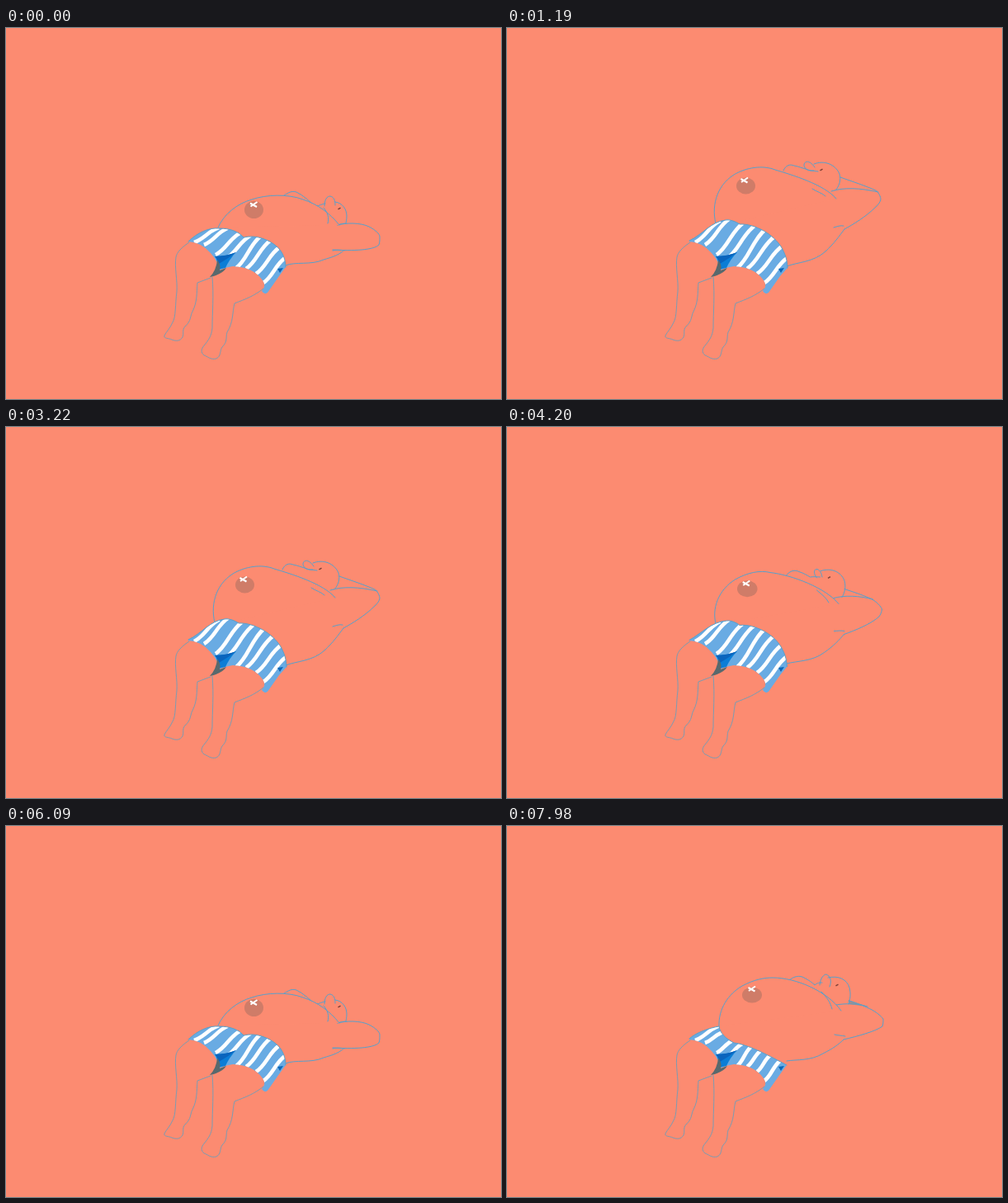
Write an HTML page that moves like this. It is 600 px wide and 450 px high and loops after 8 s.

```html
<!DOCTYPE html>
<html lang="en">
<head>
<meta charset="utf-8">
<title>Sunbather</title>
<style>
  html, body { margin: 0; width: 100%; height: 100%; overflow: hidden; background: #fc8b71; }
  svg { display: block; width: 600px; height: 450px; }
  .line { fill: none; stroke: #58a0cb; stroke-width: 1; stroke-linecap: round; stroke-linejoin: round; }
  .leg { stroke: #7b9cb2; }
</style>
</head>
<body>
<svg viewBox="0 0 600 450">
  <defs><clipPath id="clip"><path id="cut"/></clipPath></defs>
  <rect width="600" height="450" fill="#fc8b71"/>
  <path class="line leg" d="M222 260C213 266 207 272 206 278C204 290 208 306 207 320C205 335 206 351 202 357C199 364 194 369 192 373C191 377 197 376 201 378C206 380 211 380 214 375C216 370 213 367 217 362C225 355 223 349 226 344C232 332 231 322 232 309L248 303"/>
  <path class="line leg" d="M250 302C252 325 250 345 250 364C249 374 245 379 241 384C236 390 236 393 240 397C244 398 248 403 255 401C261 398 259 391 262 387C269 380 266 376 268 369C276 356 274 346 277 334C290 329 301 325 312 316"/>
  <path id="patch" d="M414 211L437 219L414 216Z" fill="#a68d88"/>
  <path id="behind" class="line"/>
  <path id="belly" class="line" style="fill:#fc8b71"/>
  <path id="marks" class="line"/>
  <path id="shorts" fill="#69abe3"/>
  <path id="stripes" clip-path="url(#clip)" fill="none" stroke="#fff" stroke-width="4.6"/>
  <path d="M253 277Q266 277 279 272Q271 280 266 291L256 293Q258 284 253 277Z" fill="#0b7dd6"/>
  <path d="M253 277Q266 277 279 272Q270 279 258 286Q257 281 253 277Z" fill="#0a64bd"/>
  <path d="M256 281Q261 288 259 294L267 291Q262 299 247 302Q255 294 256 281Z" fill="#58696d"/>
  <path d="M329 292L336 291L332 297Z" fill="#0b68ba"/>
  <path id="waist" class="line"/>
  <ellipse id="navel" fill="#cf7c68"/>
  <path id="cross" d="M-4-1.5L4 3M4.5-3L-3.5 2.5" stroke="#fff" stroke-width="2.1" fill="none"/>
  <path id="eye" d="M-1.5 .8L1.5-.8" stroke="#7c4038" stroke-width="1.5"/>
</svg>
<script>
const el = id => document.getElementById(id);
const NUM = /-?\d+(\.\d+)?/g;
const HEM = "L331 301L317 321Q313 324 310 319Q316 313 311 306Q300 290 275 289Q266 290 258 294Q258 284 248 273Q237 260 221 259Z";

// Stripe: foot on the hem, then its place along the waistband
const STRIPES = [
  [228, 260, .275], [240, 263, .35], [254, 275, .465], [266, 280, .56],
  [279, 291, .645], [291, 292, .735], [303, 298, .83], [312, 309, .93]
];

// Each pose: arm, inner arm, head, nose, shoulder, back / belly / neck and crease / waist / spots
const POSES = {
  low: [
    "M402 239C412 236 430 236 440 241C448 245 453 250 453 253C453 258 453 260 452 263C447 268 430 271 396 269M402 239C405 238 408 237 412 237M399 211C408 212 413 220 413 228C413 233 412 235 412 237M386 216C386 208 389 204 393 204C398 205 399 210 399 215M337 203C342 200 346 197 352 199C361 203 368 211 375 216C380 216 383 213 387 213M339 288C350 283 370 288 385 281C395 278 402 276 408 271",
    "M257 242C264 226 280 213 298 208C315 202 342 201 360 208C378 214 392 224 404 239",
    "M385 218C390 224 392 230 390 237M396 270C400 269 405 269 410 270",
    "M221 259C232 248 246 242 258 243C272 243 282 247 288 254C304 250 320 258 327 264C336 271 339 282 339 290",
    "300.5 220.5 11.5 10.5 300 214 404 219 0"],
  rise1: [
    "M414 212C421 214 428 216 436 220C446 224 453 230 456 234C456 238 456 240 455 243C447 249 425 255 408 259M399 217C410 215 425 215 437 219M389 184C402 181 412 186 415 196C417 204 416 210 414 216M379 193C380 184 384 180 387 180C392 182 394 188 391 195M342 187C348 182 355 181 360 184C366 187 370 190 373 193C376 190 379 190 382 190M339 285C352 283 368 285 383 276C395 270 402 265 408 259",
    "M253 240C248 222 260 203 278 192C293 184 303 181 313 181C345 181 388 200 405 222",
    "M381 201C388 208 392 214 394 222M397 253C401 254 405 254 410 255",
    "M221 259C236 249 248 238 268 237C274 237 279 240 282 243C300 240 322 253 328 262C336 272 338 282 339 290",
    "293 201 13 10 292 194.5 400 193 1"],
  rise2: [
    "M404 181C418 186 436 192 447 197C451 200 453 205 453 208C452 212 450 214 447 217C435 229 420 238 409 244M393 198C408 193 428 194 450 199M372 165C384 160 398 165 403 177C405 184 403 192 398 197M372 173C364 174 360 170 360 166C361 160 368 161 373 169M335 173C338 166 343 165 348 167C354 168 358 170 362 171C366 173 370 173 377 174M339 289C352 284 372 284 386 271C396 262 403 252 409 244",
    "M254 241C247 218 253 192 275 178C290 169 310 166 325 172C345 178 385 190 399 207",
    "M370 195C376 199 382 200 386 204M396 242C400 241 404 239 408 240",
    "M221 258C238 250 247 235 265 233C270 232 278 235 282 238C302 237 324 252 332 265C337 273 340 282 340 291",
    "289.5 191.5 11.5 10 287.5 184.5 381 172 0"],
  full: [
    "M398 171C412 174 430 180 442 186C448 190 450 194 450 198C449 203 447 206 444 209C434 222 420 230 409 236M388 189C402 184 424 184 446 189M366 154C378 149 393 154 398 167C400 174 398 182 393 188M365 162C357 161 354 156 354 153C356 148 363 150 368 158M334 141C338 142 342 146 346 150C350 154 354 156 358 158C361 160 364 161 368 162M339 289C358 284 378 280 391 262C400 250 405 244 409 236",
    "M240 231C222 190 228 140 258 115C280 97 310 99 332 118C352 136 366 162 388 194",
    "M368 188C374 192 380 194 384 198M396 236C400 235 404 233 408 234",
    "M221 258C226 250 232 240 240 231C245 246 256 258 268 266C284 275 306 281 318 285C326 288 333 290 339 290",
    "274 141 11 11 271 133 376 162 0"],
  fall1: [
    "M408 192C420 194 442 198 451 203C456 206 457 210 457 213C456 217 452 221 447 224C435 236 420 247 407 249M396 206C410 202 435 202 454 204M381 171C392 168 405 176 408 187C408 195 405 201 399 206M370 175C369 169 373 167 376 168C380 170 382 174 382 178M344 176C350 170 357 168 362 170C366 172 369 174 371 176C373 178 375 180 377 181M339 288C355 285 375 284 386 272C395 265 402 257 407 249",
    "M249 237C249 212 264 188 285 177C302 170 318 169 335 174C355 180 386 196 400 214",
    "M374 201C380 204 386 209 390 213M397 247C401 245 405 244 409 244",
    "M221 258C228 252 240 241 249 237C254 247 262 258 271 264C285 270 306 279 318 284C326 288 333 289 339 290",
    "292.5 194 11 10 291 187 389 179 0"]
};
// Same upper body as rise1, with the belly sinking over the waistband
POSES.fall2 = [
  POSES.rise1[0],
  "M257 243C256 222 268 204 285 194C300 186 312 184 322 184C350 184 388 200 405 224",
  POSES.rise1[2],
  "M221 258C228 251 245 245 257 243C258 251 265 258 275 263C292 265 316 278 324 282C331 286 336 288 339 290",
  "297 205 12 9.5 296.5 197.5 400 193 1"
];

// Two breaths in 29 steps
const STEP = 70, CYCLE = 29, LOOP = 8000;
const KEYS = [
  [0, "low"], [1, "rise1"], [3, "rise2"], [6, "full"], [8, "full"],
  [11, "fall1"], [12, "fall2"], [13, "low"], [14, "low"], [15, "rise1"],
  [17, "rise2"], [21, "full"], [23, "full"], [26, "fall1"], [27, "fall2"], [29, "low"]
];

function mix(a, b, k) {
  const to = b.match(NUM);
  let i = 0;
  return a.replace(NUM, n => +(+n + (to[i++] - n) * k).toFixed(2));
}

function poseAt(step) {
  const j = KEYS.findIndex(key => key[0] > step);
  const [s0, a] = KEYS[j - 1], [s1, b] = KEYS[j];
  let k = (step - s0) / (s1 - s0);
  if (b === "full") k = Math.sin(k * Math.PI / 2);
  else if (a === "full") k = 1 - Math.cos(k * Math.PI / 2);
  return POSES[a].map((part, i) => mix(part, POSES[b][i], k));
}

// Slightly wavy bands from the hem to just past the waistband
function stripePath() {
  const waist = el("waist"), length = waist.getTotalLength();
  return STRIPES.map(([x, y, place]) => {
    const top = waist.getPointAtLength(place * length);
    const dx = top.x - x, dy = top.y - y;
    const at = (u, v) => `${x + dx * u} ${y + dy * v}`;
    return `M${x} ${y}C${at(.45, .25)} ${at(.55, .75)} ${at(1.05, 1.05)}`;
  }).join("");
}

function draw(step) {
  const [behind, belly, marks, waist, spots] = poseAt(step);
  const [nx, ny, rx, ry, cx, cy, ex, ey, shade] = spots.split(" ").map(Number);
  const set = (id, attrs) => {
    for (const name in attrs) el(id).setAttribute(name, attrs[name]);
  };
  set("behind", { d: behind });
  set("belly", { d: belly });
  set("marks", { d: marks });
  set("waist", { d: waist });
  set("shorts", { d: waist + HEM });
  set("cut", { d: waist + HEM });
  set("stripes", { d: stripePath() });
  set("navel", { cx: nx, cy: ny, rx, ry });
  set("cross", { transform: `translate(${cx} ${cy})` });
  set("eye", { transform: `translate(${ex} ${ey})` });
  set("patch", { opacity: shade === 1 ? 1 : 0 });
}

let start, last = -1;
function tick(now) {
  start ??= now;
  const step = Math.floor(((now - start) % LOOP) / STEP) % CYCLE;
  if (step !== last) draw(last = step);
  requestAnimationFrame(tick);
}
draw(0);
requestAnimationFrame(tick);
</script>
</body>
</html>
```
